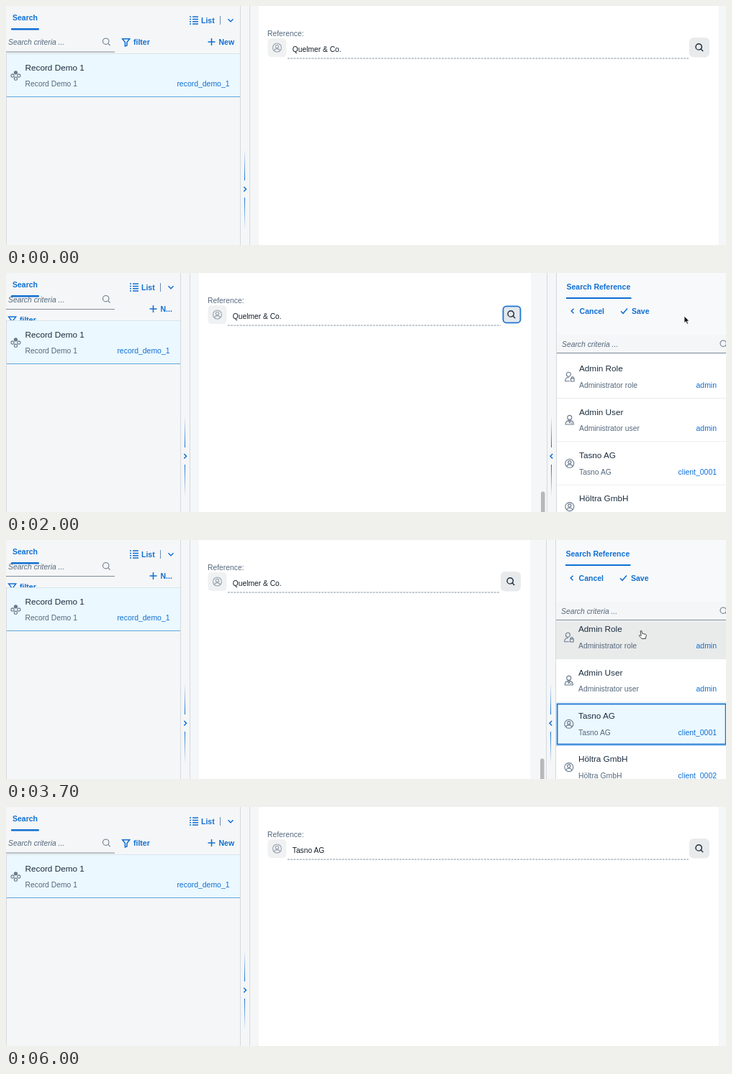
Animation, 1000 px wide and 333 px high, one loop 6.7 s. Source, as an HTML page:

```html
<!DOCTYPE html>
<html lang="en">
<head>
<meta charset="utf-8">
<title>Reference search</title>
<style>
  html, body { margin: 0; width: 100%; height: 100%; overflow: hidden; background: #f5f6f7; }
  svg { display: block; width: 100vw; height: 100vh; }
  text { font: 10.35px "Liberation Sans", Arial, sans-serif; fill: #55687c; white-space: pre; }
  .b { font-weight: bold; font-size: 10.5px; fill: #0f6fd2; }
  .i { font-style: italic; }
  .h { font-size: 11.75px; fill: #1d2d3e; }
  .v { font-size: 10.25px; fill: #131e29; }
  .a { font-size: 10.45px; fill: #0f6fd2; }
  .end { text-anchor: end; }
  .blue { fill: none; stroke: #0f6fd2; stroke-width: 1.5; }
  .slate { fill: none; stroke: #6a7b8e; stroke-width: 1.1; }
  .ring { fill: none; stroke: #1f76d2; stroke-width: 1.8; }
  .edge { fill: #d6d9dd; }
  .under { fill: #7f8c9a; }
</style>
</head>
<body>
<svg viewBox="0 0 1000 333" preserveAspectRatio="none">
  <defs>
    <linearGradient id="down" x2="0" y2="1"><stop stop-color="#0f6fd2" stop-opacity="0"/><stop offset="1" stop-color="#0f6fd2"/></linearGradient>
    <linearGradient id="up" x2="0" y2="1"><stop stop-color="#0f6fd2"/><stop offset="1" stop-color="#0f6fd2" stop-opacity="0"/></linearGradient>
    <clipPath id="listClip"><rect x="14" y="113" width="400" height="220"/></clipPath>
    <g id="lens"><circle cx="-.8" cy="-.8" r="4.2"/><path d="M2.2 2.2 5.2 5.2"/></g>
    <g id="company" class="slate"><circle r="6"/><circle cy="-1.6" r="2.1"/><path d="M-3.9 4.4Q-3.5 1.6 0 1.6T3.9 4.4"/></g>
    <g id="user" class="slate"><circle cy="-3.6" r="3"/><path d="M-5.5 6V4.5Q-5 .6 0 .6T5.5 4.5V6ZM-1.6 1 0 3.6 1.6 1M1.6 4H4"/></g>
    <g id="role" class="slate"><circle cx="-1.4" cy="-3.4" r="3"/><path d="M.4 6H-6V4.5Q-5.6 .8-1 .8M1.8 2.2H6.3V6.3H1.8ZM2.7 2V.6Q4-1 5.4 .6V2"/></g>
    <g id="splitter">
      <rect class="edge" width="1" height="333"/>
      <rect class="edge" x="13" width="1" height="333"/>
      <rect x="6" y="200" width="1" height="43" fill="url(#down)"/>
      <rect x="6" y="267" width="1" height="44" fill="url(#up)"/>
    </g>
  </defs>

  <rect width="1000" height="333" fill="#f5f6f7"/>
  <rect id="page" height="333" fill="#fff"/>
  <line id="dash" y1="73" y2="73" stroke="#8493a2" stroke-dasharray="2.9 1.3"/>

  <!-- left panel -->
  <g id="query">
    <text class="i" x="3" y="54">Search criteria ...</text>
    <use href="#lens" class="slate" x="139.5" y="50"/>
    <rect class="under" y="63.5" width="151" height="1"/>
  </g>
  <g id="filter">
    <path class="blue" d="M161.7 45.7H171.7L168 50.5V55L165.4 56V50.5Z"/>
    <text class="b" x="177" y="54">filter</text>
  </g>
  <rect width="140" height="31" fill="#f5f6f7"/>
  <text class="b" x="9" y="20.3">Search</text>
  <rect x="7" y="31" width="39" height="2.6" rx="1" fill="#0f6fd2"/>
  <rect id="record" y="66.5" height="60" fill="#ebf8ff"/>
  <rect id="recordTop" y="66" height="1" fill="#d9e4ec"/>
  <rect id="recordLine" y="126" height="1" fill="#5fa6e0"/>
  <g class="slate" transform="translate(13.5 97)">
    <circle cy="-4.2" r="2.1" fill="#6a7b8e"/><circle cx="-4.4" r="2.1"/><circle cx="4.4" r="2.1"/><circle cy="4.2" r="2.1"/>
  </g>
  <text class="h" x="26.5" y="89.8">Record Demo 1</text>
  <text x="26.5" y="112.2">Record Demo 1</text>
  <rect class="edge" y="66" width="1" height="267"/>

  <!-- items that follow the left splitter -->
  <g id="leftEdge">
    <path class="blue" d="M-66-4.5H-58M-66-1.2H-58M-66 2.1H-58M-66 5.4H-58M-70-4.5H-68M-70-1.2H-68M-70 2.1H-68M-70 5.4H-68" transform="translate(0 19.6)"/>
    <text class="b" x="-54" y="23.7">List</text>
    <rect x="-28" y="14" width="1" height="12" fill="#6a8fb5"/>
    <path class="blue" d="M-16.5 18.3-13 21.8-9.5 18.3"/>
    <g id="add"><path class="blue" d="M-44.5 50H-34.5M-39.5 45V55"/><text class="b" id="addText" x="-29.5" y="54"></text></g>
    <text class="a end" x="-14.5" y="112.2">record_demo_1</text>
    <use href="#splitter"/>
    <path class="blue" d="M5.3 252 8.5 255.3 5.3 258.6"/>
    <text x="38" y="41.5">Reference:</text>
    <rect x="38.5" y="45" width="26" height="26" rx="5" fill="#f0f1f2"/>
    <use href="#company" x="51.5" y="58" opacity=".65"/>
    <text class="v" id="value" x="72.8" y="63.6"></text>
  </g>

  <!-- items that follow the right splitter -->
  <g id="rightEdge">
    <rect id="button" x="-63" y="44" width="28" height="27.5" rx="6"/>
    <rect id="buttonRing" class="ring" x="-60.5" y="46.3" width="24" height="23" rx="4.5" style="fill:#e3e8ed"/>
    <use href="#lens" x="-49" y="57.7" fill="none" stroke="#1d2d3e" stroke-width="1.4"/>
    <rect x="-8" y="304.5" width="5.5" height="34" rx="2.7" fill="#b6b8ba"/>
    <rect width="300" height="333" fill="#f5f6f7"/>
    <rect x="14" width="300" height="86" fill="#f8f9fa"/>
    <use href="#splitter"/>
    <path class="blue" d="M8.2 252 5 255.3 8.2 258.6"/>
    <text class="b" x="27.5" y="23.2">Search Reference</text>
    <rect x="27" y="34" width="90.5" height="2" fill="#0f6fd2"/>
    <rect id="saveBack" x="95" y="39" width="55" height="28" rx="5"/>
    <rect id="saveRing" class="ring" x="95.5" y="40" width="53" height="26" rx="4.5"/>
    <path class="blue" d="M37.5 49.7 34.2 53 37.5 56.3M103 53.3 106 56.3 112 49.5"/>
    <text class="b" x="45.6" y="56.7">Cancel</text>
    <text class="b" x="118" y="56.7">Save</text>
    <text class="i" x="21" y="102.7">Search criteria ...</text>
    <rect class="under" x="14" y="111" width="300" height="1"/>
    <g clip-path="url(#listClip)"><g id="list"></g></g>
    <use id="endLens" href="#lens" class="slate" y="99"/>
  </g>

  <g id="pointer">
    <path id="arrow" d="M0 0V9.6L2.3 7.6 3.9 11.2 5.6 10.4 4 7H7Z" fill="#111" stroke="#fff" stroke-width=".8"/>
    <path id="hand" d="M-1 1Q0-.4 1 1L1.6 4.2 6.4 5.3Q7.6 5.8 7.2 7.3L6.3 11.5H1.2L-2.6 7.8Q-3 6.4-1.2 6.6L.2 7.4Z" fill="#fff" stroke="#444" stroke-width="1"/>
  </g>
</svg>
<script>
const LOOP = 6700, STEP = 100, ROW = 60.3, TOP = 114.7;
const OPEN = 1362, CLOSE = 4710, PICK = 3300, SAVE = 4400;
const rows = [
  ['Admin Role', 'Administrator role', 'admin', 'role'],
  ['Admin User', 'Administrator user', 'admin', 'user'],
  ['Tasno AG', 'Tasno AG', 'client_0001', 'company'],
  ['Höltra GmbH', 'Höltra GmbH', 'client_0002', 'company'],
];
const picked = 2;

// pointer path: time, x, y
const path = [
  [300, 573, 296], [400, 592, 284], [600, 720, 200], [800, 890, 90], [900, 936, 58],
  [1000, 962, 59], [1400, 963, 59], [1600, 967, 58], [1800, 955, 60], [2000, 942, 60],
  [2100, 918, 98], [2300, 872, 190], [2600, 872, 190], [2800, 857, 217], [3200, 838, 250],
  [3300, 838, 250], [3500, 855, 200], [3700, 882, 126], [3900, 874, 84], [4100, 879, 50],
  [5100, 879, 50], [5300, 820, 110], [5700, 596, 286], [5900, 545, 322],
];

const el = {};
document.querySelectorAll('[id]').forEach(e => el[e.id] = e);
const set = (e, attrs) => { for (const k in attrs) e.setAttribute(k, attrs[k]); };
const show = (e, on) => set(e, { visibility: on ? 'visible' : 'hidden' });
const move = (e, x, y = 0) => set(e, { transform: `translate(${x} ${y})` });
const within = (t, a, b) => t >= a && t < b;
const settle = (t, tau) => t <= 0 ? 0 : 1 - Math.exp(-t / tau);
const opened = (t, tau) => t < CLOSE ? settle(t - OPEN, tau) : 1 - settle(t - CLOSE, tau);

el.list.innerHTML = rows.map(([name, note, id, icon], i) => `
  <g transform="translate(0 ${TOP + ROW * i})">
    <rect class="back" x="14" y="${i ? 0 : -10}" width="400" height="${i ? ROW : ROW + 10}"/>
    <rect class="line" x="14" y="${ROW - .8}" width="400" height="1"/>
    <use href="#${icon}" x="31.8" y="30"/>
    <text class="h" x="45" y="22.5">${name}</text>
    <text x="45" y="45.4">${note}</text>
    <text class="a end link" y="45.4">${id}</text>
  </g>`).join('') +
  `<rect id="mark" class="ring" x="15.6" y="${TOP + ROW * picked + 2.2}" height="${ROW - 4.2}"/>`;
el.mark = document.getElementById('mark');
const backs = el.list.querySelectorAll('.back');
const lines = el.list.querySelectorAll('.line');
const links = el.list.querySelectorAll('.link');

function pointerAt(t) {
  const n = path.findIndex(p => p[0] > t);
  if (n < 1) return path[n ? path.length - 1 : 0].slice(1);
  const [a, b] = [path[n - 1], path[n]];
  const k = (t - a[0]) / (b[0] - a[0]);
  return [1, 2].map(i => a[i] + (b[i] - a[i]) * k);
}

function layout(left, right) {
  const narrow = left < 272;
  set(el.page, { x: left + 26, width: right - left - 48 });
  set(el.dash, { x1: left + 66, x2: right - 64 });
  for (const e of [el.record, el.recordTop, el.recordLine]) set(e, { width: left });
  move(el.leftEdge, left);
  move(el.rightEdge, right);
  move(el.query, 0, narrow ? -13.5 : 0);
  move(el.filter, narrow ? -158 : 0, narrow ? 15.4 : 0);
  move(el.add, narrow ? 2 : 0);
  el.addText.textContent = narrow ? 'N...' : 'New';
  const end = Math.max(987 - right, 205);
  links.forEach(e => set(e, { x: end }));
  set(el.endLens, { x: end + 10 });
  set(el.mark, { width: Math.max(0, 984 - right) });
}

function draw(t) {
  const left = Math.round(325 - 83 * opened(t, 100));
  const right = Math.round(1012 - 262 * opened(t, 113));
  layout(left, right);
  const scroll = t < 2600 ? 0 : Math.min(9, 4 + (t - 2600) / 25);
  move(el.list, 0, -scroll);

  const [x, y] = pointerAt(t);
  const over = x > right + 13 && y > 113 && within(t, 2100, CLOSE)
    ? Math.floor((y - TOP + scroll) / ROW) : -1;
  const chosen = t >= PICK;
  backs.forEach((e, i) => {
    const on = chosen && i === picked;
    set(e, { fill: on ? '#ebf8ff' : i === over ? '#e9ebeb' : '#fff' });
    set(lines[i], { fill: on ? '#5fa6e0' : '#e3e6e9' });
  });
  show(el.mark, within(t, PICK, SAVE));

  const focus = within(t, 1100, PICK);
  show(el.buttonRing, focus);
  show(el.button, !focus);
  set(el.button, { fill: within(t, 1000, 1100) ? '#e0e4e8' : '#e8eaec' });
  show(el.saveRing, t >= SAVE);
  show(el.saveBack, t >= 4000);
  set(el.saveBack, { fill: t >= SAVE ? '#fff' : '#eaecee' });
  el.value.textContent = t >= CLOSE ? rows[picked][0] : 'Quelmer & Co.';

  const hand = over >= 0 || within(t, 1000, 1700) || within(t, 4000, 4800);
  const seen = within(t, 300, 6000);
  move(el.pointer, x, y);
  show(el.hand, seen && hand);
  show(el.arrow, seen && !hand);
}

function tick() {
  const t = performance.now() % LOOP;
  draw(Math.floor(t / STEP) * STEP);
  requestAnimationFrame(tick);
}
tick();
</script>
</body>
</html>
```
